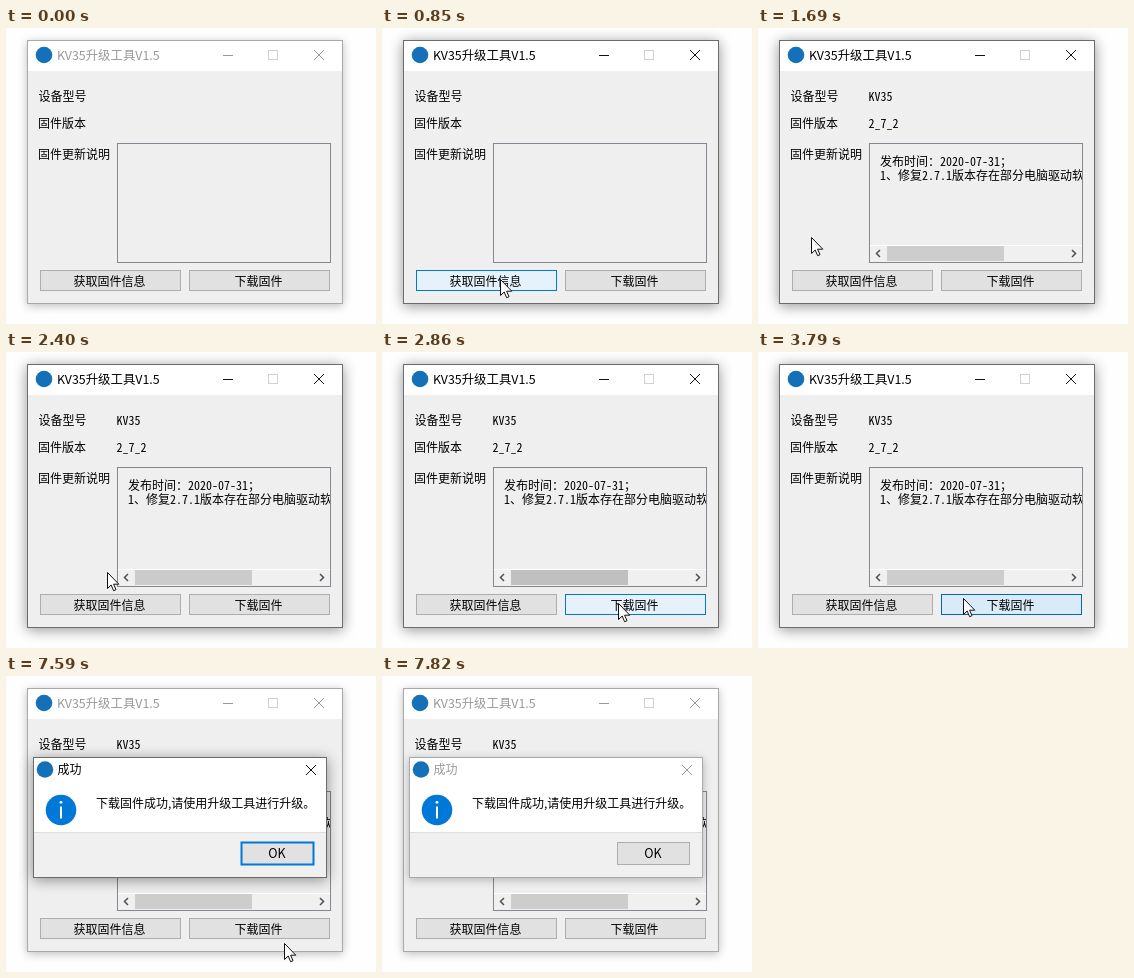
These frames come from a looping animation (370x296 px, 7990 ms). An HTML page:

```html
<!DOCTYPE html>
<html lang="zh-CN">
<head>
<meta charset="utf-8">
<title>升级工具</title>
<style>
  html, body { margin: 0; width: 100%; height: 100%; overflow: hidden; background: #fefefe; }
  svg { display: block; }
  text { font: 12px "Noto Sans CJK SC", sans-serif; white-space: pre; }
  .mono { font-family: "Noto Sans Mono CJK SC", "Noto Sans CJK SC", monospace; }
  .mid { text-anchor: middle; }
  .edge { fill: none; stroke: #6c6c6c; }
  .caption { fill: #000; }
  .glyph { fill: none; stroke: #111; }
  .shadow { filter: blur(7px); opacity: .42; }
  .inactive > .edge { stroke: #a8a8a8; }
  .inactive > .caption { fill: #999; }
  .inactive > .glyph { stroke: #999; }
  .inactive > .shadow { filter: blur(5px); opacity: .25; }
  .icon { fill: #1470b8; }
  .ok { fill: #e1e1e1; stroke: #0078d7; stroke-width: 2; }
  .inactive > .ok { stroke: #adadad; stroke-width: 1; }
</style>
</head>
<body>
<svg width="370" height="296" viewBox="0 0 370 296">
  <g id="main">
    <rect class="shadow" x="21" y="14" width="316" height="264"/>
    <rect x="21" y="12" width="316" height="264" fill="#efefef"/>
    <rect x="22" y="13" width="314" height="30" fill="#fff"/>
    <rect class="edge" x="21.5" y="12.5" width="315" height="263"/>
    <circle class="icon" cx="38" cy="27" r="8.3"/>
    <text class="caption" x="51" y="32" style="font-size:12.4px">KV35升级工具V1.5</text>
    <path class="glyph" d="M217 27.5h10M308 22l10 10m0-10l-10 10"/>
    <rect x="262.5" y="22.5" width="9" height="9" fill="none" stroke="#d0d0d0"/>

    <text x="32.5" y="72.5">设备型号</text>
    <text x="32" y="99.5">固件版本</text>
    <text x="32" y="130.5">固件更新说明</text>
    <rect x="111.5" y="115.5" width="213" height="119" fill="#efefef" stroke="#828790"/>

    <g id="info">
      <text class="mono" x="110.5" y="72.5">KV35</text>
      <text class="mono" x="110.5" y="99.5">2_7_2</text>
      <clipPath id="box"><rect x="112" y="116" width="212" height="118"/></clipPath>
      <g clip-path="url(#box)">
        <text class="mono" x="122" y="137.5">发布时间：2020-07-31；</text>
        <text class="mono" x="122" y="151.5">1、修复2.7.1版本存在部分电脑驱动软件</text>
      </g>
      <rect x="112" y="217" width="212" height="17" fill="#f0f0f0"/>
      <path d="M112 217.5h212" stroke="#fff"/>
      <rect id="thumb" x="129" y="218" width="117" height="15"/>
      <path d="M122 222l-3.5 3.5 3.5 3.5M314 222l3.5 3.5-3.5 3.5" fill="none" stroke="#505050" stroke-width="1.5"/>
    </g>

    <rect id="fetch" x="34.5" y="242.5" width="140" height="20"/>
    <text class="mid" x="103.5" y="257.5">获取固件信息</text>
    <rect id="download" x="183.5" y="242.5" width="140" height="20"/>
    <text class="mid" x="252.5" y="257.5">下载固件</text>
  </g>

  <g id="dialog">
    <rect class="shadow" x="27" y="83" width="294" height="121"/>
    <rect x="27" y="81" width="294" height="121" fill="#fff"/>
    <rect x="28" y="156" width="292" height="45" fill="#f0f0f0"/>
    <path d="M28 156.5h292" stroke="#dfdfdf"/>
    <rect class="edge" x="27.5" y="81.5" width="293" height="120"/>
    <circle class="icon" cx="39" cy="93.5" r="8.3"/>
    <text class="caption" x="51.5" y="98">成功</text>
    <path class="glyph" d="M300 89l10 10m0-10l-10 10"/>
    <circle cx="55" cy="134" r="15.3" fill="#0078d7"/>
    <path d="M55 130.5v12" stroke="#fff" stroke-width="2"/>
    <circle cx="55" cy="126.3" r="1.4" fill="#fff"/>
    <text x="90" y="131.5">下载固件成功,请使用升级工具进行升级。</text>
    <rect class="ok" x="235.5" y="166.5" width="72" height="22"/>
    <text class="mid" x="271" y="182" style="font-size:12.5px">OK</text>
  </g>

  <path id="cursor" d="M.5 .5V16.5L4.2 13 6.6 18.7 9 17.7 6.6 12.2H11.8Z" fill="#fff" stroke="#111"/>
</svg>
<script>
const LOOP = 7990, STEP = 76.7, FADE = 220;
const ENTER = 380, FETCH = 850, LOADED = 1690, RETURN = 2240,
      PRESS = 3330, RELEASE = 3710, OPEN = 4340, LEAVE = 7590, BLUR = 7820;
const bursts = [0, ENTER, FETCH, RETURN, PRESS, RELEASE, OPEN, LEAVE];

const cursorStart = { x: 152, y: 296 };
const cursorMoves = [
  { at: ENTER, lasts: FADE, x: 118, y: 251 },
  { at: 1150, lasts: 450, x: 53, y: 209 },
  { at: RETURN, lasts: 605, x: 236, y: 251 },
  { at: RELEASE, lasts: 70, x: 205, y: 246 },
  { at: OPEN, lasts: FADE, x: 248, y: 250 },
  { at: LEAVE, lasts: 70, x: 304, y: 282 }
];

const el = id => document.getElementById(id);
const mix = (a, b, p) => `color-mix(in srgb, ${b} ${p * 100}%, ${a})`;

// Eased 0..1; the first sampled step has already begun to move.
function ramp(t, at, lasts = FADE) {
  const p = Math.min(1, Math.max(0, (t - at + STEP) / (lasts + STEP)));
  return p * p * (3 - 2 * p);
}

const pulse = (t, on, off) => ramp(t, on) - ramp(t, off);

// Movement runs at a low frame rate, restarting with each burst.
function sampled(t) {
  const start = bursts.filter(b => b <= t).pop();
  return start + Math.floor((t - start) / STEP + 0.1) * STEP;
}

function cursorAt(t) {
  return cursorMoves.reduce((pos, move) => {
    const p = ramp(t, move.at, move.lasts);
    return { x: pos.x + (move.x - pos.x) * p, y: pos.y + (move.y - pos.y) * p };
  }, cursorStart);
}

function paintButton(id, hover, press) {
  el(id).style.fill = mix(mix('#e1e1e1', '#e5f1fb', hover), '#cce4f7', press);
  el(id).style.stroke = mix(mix('#adadad', '#0078d7', hover), '#005499', press);
}

const show = (id, on) => { el(id).style.display = on ? '' : 'none'; };

function draw(t) {
  const s = sampled(t);
  el('main').classList.toggle('inactive', t < FETCH || t >= OPEN);
  el('dialog').classList.toggle('inactive', t >= BLUR);
  show('info', t >= LOADED);
  show('dialog', t >= OPEN);
  show('cursor', t >= ENTER && t < BLUR);

  paintButton('fetch', pulse(s, 450, 1300), pulse(s, FETCH + STEP, 1080));
  paintButton('download', pulse(s, 2620, OPEN), pulse(s, PRESS, RELEASE));
  el('thumb').style.fill = mix('#cdcdcd', '#c0c0c0', pulse(s, 2400, 2930));

  const open = ramp(s, OPEN), scale = 0.9 + 0.1 * open;
  el('dialog').setAttribute('opacity', open);
  el('dialog').setAttribute('transform', `translate(174 141.5) scale(${scale}) translate(-174 -141.5)`);

  const { x, y } = cursorAt(s);
  el('cursor').setAttribute('transform', `translate(${Math.round(x)} ${Math.round(y)})`);
}

function tick() {
  draw(performance.now() % LOOP);
  requestAnimationFrame(tick);
}
tick();
</script>
</body>
</html>
```
